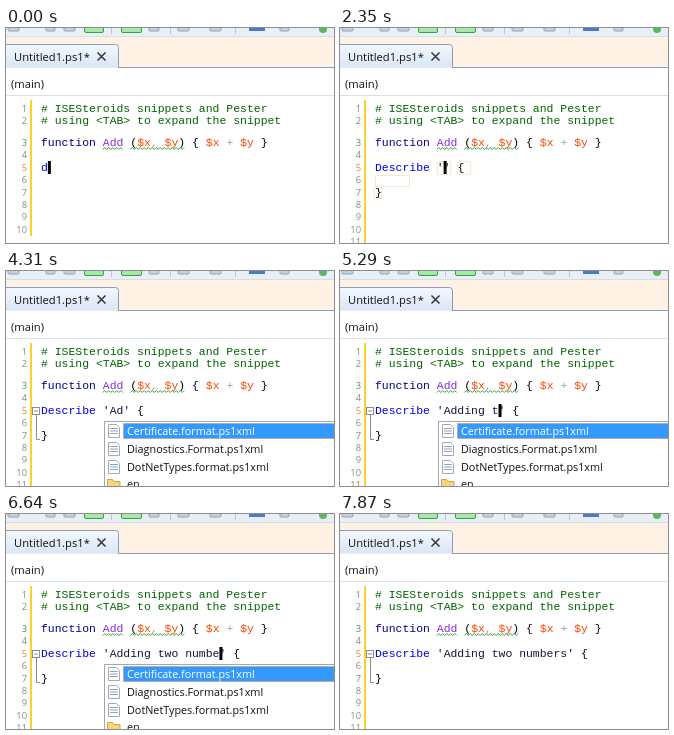
An HTML page that plays this animation: 328x215 px, repeating every 8000 ms.

```html
<!DOCTYPE html>
<html lang="en">
<head>
<meta charset="utf-8">
<title>Snippet editor</title>
<style>
  html, body { margin: 0; width: 100%; height: 100%; overflow: hidden; background: #fff; }
  svg { display: block; width: 328px; height: 215px; }
  text { white-space: pre; }
  .code { font: 11.44px "Liberation Mono", monospace; }
  .num { font: 9.4px "Open Sans", sans-serif; text-anchor: end; fill: #858b83; }
  .ui { font: 11.2px "Open Sans", sans-serif; fill: #111; }
  .list { font-size: 10.8px; }
  .comment { fill: #006400; }
  .keyword { fill: #00008b; }
  .command { fill: #0000e6; }
  .name { fill: #8a2be2; }
  .variable { fill: #ff4500; }
  .operator { fill: #a0a0a0; }
  .string { fill: #14143c; }
  .plain { fill: #000; }
</style>
</head>
<body>
<svg id="stage" viewBox="0 0 328 215">
  <defs>
    <linearGradient id="tab" x2="0" y2="1">
      <stop stop-color="#f3f8fe"/><stop offset="1" stop-color="#d9e6f6"/>
    </linearGradient>
  </defs>
  <rect width="328" height="215" fill="#fff"/>
  <g id="toolbar"></g>
  <rect y="9" width="328" height="31" fill="#fff1e3"/>
  <path d="M0 8.5H328" stroke="#d5dde8"/>
  <path d="M-1 39.5V16.5H109.5Q112.5 16.5 112.5 19.5V39.5" fill="url(#tab)" stroke="#8b9db7"/>
  <path d="M112 39.5H328" stroke="#8b9db7"/>
  <text class="ui" x="8" y="33">Untitled1.ps1*</text>
  <path d="M91.5 24.5l8 8m0-8l-8 8" stroke="#333" stroke-width="1.5"/>
  <text class="ui" x="5" y="60">(main)</text>
  <path d="M0 67.5H328" stroke="#d5e2ee"/>
  <rect id="bar" x="24" y="72" width="2" fill="#ffd02a"/>
  <g id="numbers"></g>
  <g id="code"></g>
  <path id="waves" fill="none" stroke="#35a035"/>
  <g id="slots" fill="none" stroke="#fce6cf">
    <rect x="97.5" y="133.5" width="13" height="13"/>
    <rect x="117.5" y="133.5" width="13" height="13"/>
    <rect x="35.5" y="147.5" width="34" height="11"/>
    <rect x="34.5" y="158.5" width="7" height="12"/>
  </g>
  <text id="typed" class="code" x="35" y="142.8"></text>
  <text id="close" class="code plain" x="35" y="167.6">}</text>
  <g id="fold" fill="none" stroke="#8c8c8c">
    <rect x="26.5" y="136.5" width="7" height="7" fill="#fff"/>
    <path d="M28 140H32M30.5 144V168.5H34"/>
  </g>
  <rect id="caret" y="133" width="3" height="13" fill="#000"/>
  <g id="popup"></g>
</svg>
<script>
const LOOP = 8000, LEFT = 35, CHAR = 6.863, LINE = 12.4;
const $ = id => document.getElementById(id);
const col = n => LEFT + n * CHAR;
const span = (type, s) => `<tspan class="${type}">${s.replace(/</g, "&lt;")}</tspan>`;
const codeLine = (y, ...parts) =>
  `<text class="code" x="${LEFT}" y="${y}">${parts.map(p => span(...p)).join("")}</text>`;
const show = (el, on) => el.setAttribute("visibility", on ? "visible" : "hidden");

// Lines 1 and 2 sit above a wider gap.
const baseline = n => n < 3 ? 84 + (n - 1) * LINE : 118 + (n - 3) * LINE;

function button(x, w, fill, edge) {
  return `<rect x="${x + .5}" y="-6.5" width="${w}" height="11" rx="1.5" fill="${fill}" stroke="${edge}"/>`;
}

function wave(from, to) {
  let d = `M${col(from)} 121.5`;
  for (let x = col(from), i = 0; x < col(to) - 2; x += 2, i++) d += `l2 ${i % 2 ? 2 : -2}`;
  return d;
}

function fileIcon(y) {
  return `<path d="M102.5 ${y - 6.5}h8l3 3v10h-11z" fill="#fff" stroke="#a3abb5"/>
    <path d="M104 ${y - 2.5}h8m-8 2.5h8m-8 2.5h8" stroke="#8fa6c0"/>`;
}

function buildToolbar() {
  const icons = [[2, 11], [40, 9], [58, 11], [143, 10], [172, 11], [204, 11], [274, 9]];
  $("toolbar").innerHTML = `<rect width="328" height="9" fill="#e9eff7"/>` +
    icons.map(([x, w]) => `<rect x="${x}" y="-4" width="${w}" height="7" rx="1" fill="#c6d0dd" stroke="#94a2b5"/>`).join("") +
    button(78, 19, "#a9e8a9", "#2fa53f") +
    button(115, 20, "#a9e8a9", "#2fa53f") +
    `<path d="M243 1.5H259" stroke="#4f79c4" stroke-width="3"/>
    <circle cx="317" cy="1" r="4" fill="#5cb85c"/>
    <path d="M105.5 0V6M164.5 0V6M229.5 0V6" stroke="#bac6d6"/>`;
}

function buildEditor() {
  const tint = { 3: "#3f9a3f", 5: "#e08a1e" };
  let nums = "";
  for (let n = 1; n <= 11; n++) {
    const fill = tint[n] ? ` style="fill:${tint[n]}"` : "";
    nums += `<text class="num" id="n${n}" x="21" y="${baseline(n)}"${fill}>${n}</text>`;
  }
  $("numbers").innerHTML = nums;
  $("code").innerHTML =
    codeLine(baseline(1), ["comment", "# ISESteroids snippets and Pester"]) +
    codeLine(baseline(2), ["comment", "# using <TAB> to expand the snippet"]) +
    codeLine(baseline(3), ["keyword", "function "], ["name", "Add "], ["plain", "("],
      ["variable", "$x"], ["operator", ", "], ["variable", "$y"], ["plain", ") { "],
      ["variable", "$x "], ["operator", "+ "], ["variable", "$y "], ["plain", "}"]);
  $("waves").setAttribute("d", wave(9, 12) + wave(13, 21));
}

function buildPopup() {
  const files = ["Certificate.format.ps1xml", "Diagnostics.Format.ps1xml", "DotNetTypes.format.ps1xml", "en"];
  const rows = files.map((name, i) => {
    const y = 160 + i * 17.8;
    const icon = i < 3 ? fileIcon(Math.round(y))
      : `<path d="M101.5 208.5h5l1.5 2h6v8h-12.5z" fill="#f5d67b" stroke="#cfa746"/>`;
    return icon + `<text class="ui list" x="121" y="${y + 4}"${i ? "" : ' style="fill:#fff"'}>${name}</text>`;
  });
  $("popup").innerHTML = `<rect x="98.5" y="150.5" width="240" height="80" fill="#fff" stroke="#a3a8b0"/>
    <rect x="117.5" y="152.5" width="220" height="15" fill="#3399ff" stroke="#d98a3a" stroke-dasharray="1 1"/>` + rows.join("");
}

const TITLE = "Adding two numbers";
const KEYS = [3610, 3730, 4470, 4610, 4730, 4890, 5160, 5290, 5430, 5550,
  5800, 5930, 6080, 6230, 6510, 6640, 6920, 7040];
const CARET_OFF = [[800, 1230], [1760, 2350], [2800, 3330], [4310, 4470], [7470, LOOP]];
const EXPAND = 2350, LIST_OPEN = 2500, LIST_CLOSE = 7870;

let lastLine = "";
function draw(t) {
  const expanded = t >= EXPAND;
  const count = KEYS.filter(k => t >= k).length;
  const prefix = "des".slice(0, t < 120 ? 1 : t < 240 ? 2 : 3);
  const line = expanded
    ? span("command", "Describe ") + span("string", `'${TITLE.slice(0, count)}'`) + span("plain", " {")
    : span("command", prefix);
  if (line !== lastLine) $("typed").innerHTML = lastLine = line;

  $("caret").setAttribute("x", col(expanded ? 10 + count : prefix.length));
  show($("caret"), !CARET_OFF.some(([a, b]) => t >= a && t < b));
  show($("slots"), expanded && t < KEYS[0]);
  show($("close"), expanded);
  show($("n11"), expanded);
  show($("fold"), t >= LIST_OPEN);
  show($("popup"), t >= LIST_OPEN && t < LIST_CLOSE);
  $("bar").setAttribute("height", expanded ? 143 : 136);
}

buildToolbar();
buildEditor();
buildPopup();
const start = performance.now();
function tick() {
  draw((performance.now() - start) % LOOP);
  requestAnimationFrame(tick);
}
tick();
</script>
</body>
</html>
```
